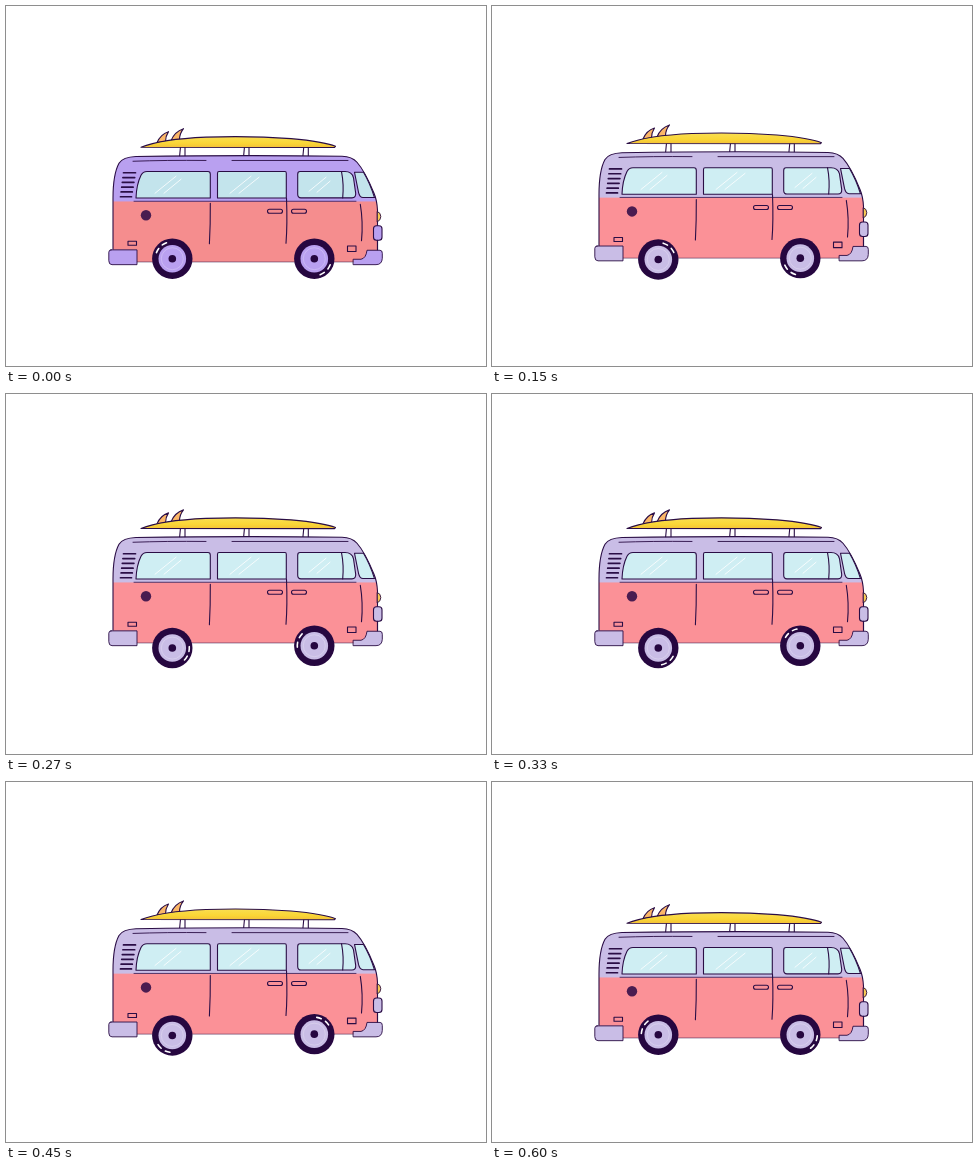
An HTML page for the animation above (630 ms loop, 480 px wide and 360 px high).

```html
<!DOCTYPE html>
<html lang="en">
<head>
<meta charset="utf-8">
<title>Camper van</title>
<style>
html, body { margin: 0; width: 100%; height: 100%; overflow: hidden; background: #fff; }
svg { display: block; width: 100vw; height: 100vh; }
.ink { stroke: #2a0d45; stroke-width: 1.1; stroke-linejoin: round; stroke-linecap: round; }
.thin { stroke-width: .9; }
.line { fill: none; }
.purple { fill: var(--purple); }
.pink { fill: var(--pink); }
.glass { fill: var(--glass); }
.glare { fill: none; stroke: #fff; stroke-width: 1; stroke-linecap: round; opacity: .8; }
.shine { fill: none; stroke: #fff; stroke-width: 1.6; stroke-linecap: round; }
</style>
</head>
<body>
<svg viewBox="0 0 480 360">
  <defs>
    <linearGradient id="wax" x1="0" y1="0" x2="0" y2="1">
      <stop offset="0" stop-color="#f9de52"/>
      <stop offset=".6" stop-color="#fad636"/>
      <stop offset="1" stop-color="#f3c138"/>
    </linearGradient>
    <clipPath id="shell">
      <path d="M107 255.8V192Q107 168 113 157Q117 150.800 130 150.300Q240 148.600 336 150Q346 150.300 351 156Q359 165 368 187Q371 194 371.500 204V255.800Z"/>
    </clipPath>
    <g id="wheel">
      <circle r="20.2" fill="#260740"/>
      <circle class="purple" r="13.8"/>
      <circle r="11" fill="none" stroke="#fff" stroke-width=".8" opacity=".3"/>
      <circle r="3.8" fill="#260740"/>
    </g>
  </defs>

  <path id="poles" class="ink" fill="#fff"/>

  <g id="body">
    <g clip-path="url(#shell)">
      <rect class="purple" x="100" y="145" width="280" height="51"/>
      <rect class="pink" x="100" y="195.2" width="280" height="62"/>
    </g>
    <path class="ink line" d="M107 243V192Q107 168 113 157Q117 150.800 130 150.300Q240 148.600 336 150Q346 150.300 351 156Q359 165 368 187Q371 194 371.500 204V244"/>
    <path class="ink line thin" stroke-opacity=".55" d="M131 255.700H347"/>
    <path class="ink line thin" d="M127 155Q160 153.800 200 154.200M226 154.200H342"/>
    <path class="ink line thin" stroke-opacity=".85" d="M128 195H350"/>

    <path class="ink glass" d="M141 165.300H202Q204.300 165.300 204.300 168V191.800H130Q130.500 178 135 169Q137 165.300 141 165.300Z"/>
    <path class="ink glass" d="M213 165.300H279Q280.300 165.300 280.300 167V191.800H211.500V167Q211.500 165.300 213 165.300Z"/>
    <path class="ink glass" d="M294 165.300H339Q346 165.300 347.500 171.500L349.700 187Q350 191.600 346 191.600H295Q291.700 191.600 291.700 188V168Q291.700 165.300 294 165.300Z"/>
    <path class="ink line" d="M335.500 165.300Q338 178 336.700 191.600"/>
    <path class="ink glass" d="M348.500 166H357.500Q364 177 368.500 191.300H357Q353.800 191.300 352.500 186Z"/>
    <path class="glare" d="M149 187L170 170M158 187L175 173M224 187L245 170M233 187L253 171M303 185L320 171M311 186L324 175"/>

    <path id="vents" class="ink line" style="stroke-width:1.7"/>
    <path class="ink line" d="M204.300 197Q204.500 218 203.400 237.500M280.500 192Q281.500 218 280 237M354.300 198Q357.300 216 355.500 234.500"/>
    <rect class="ink pink" x="261.500" y="203" width="15" height="4" rx="2"/>
    <rect class="ink pink" x="285.500" y="203" width="15" height="4" rx="2"/>
    <circle cx="140" cy="209" r="5.200" fill="#4a1c50"/>
    <rect class="ink pink" x="122" y="235" width="8.500" height="4"/>
    <rect class="ink pink" x="341.500" y="239.700" width="8.500" height="5.500"/>

    <path class="ink thin" fill="#f8cb55" d="M371.500 205.300Q374.800 206.500 374.800 210.300T371.500 215.500Z"/>
    <rect class="ink purple" x="367.500" y="219.500" width="8.500" height="14.500" rx="3"/>
    <path class="ink line" d="M371.500 234V244"/>
    <path class="ink purple thin" d="M105 243.600H131V258.400H106Q102.800 258.400 102.800 254.400V246Q102.800 243.600 105 243.600Z"/>
    <path class="ink purple thin" d="M347.500 253H355Q360 252 361 244H374Q376.300 244 376.300 247V252Q376 258.400 370 258.400H347.500Z"/>
  </g>

  <g id="board">
    <path class="ink" fill="#fbb767" d="M151 137Q154.500 128.500 162.500 126Q159.500 130.500 159.500 136ZM165 135Q168.500 126 177.500 123Q173.500 128 173.500 134Z"/>
    <path class="ink" fill="url(#wax)" d="M135 141.600Q155 133.500 200 131.500Q245 130 285 133Q318 136 329.500 140.700L328.500 141.800Z"/>
  </g>

  <g id="rear"><use href="#wheel"/><path class="shine"/></g>
  <g id="front"><use href="#wheel"/><path class="shine"/></g>
</svg>
<script>
const LOOP = 630, STEP = 30, TURN = 2 * Math.PI;
const $ = id => document.getElementById(id);
const svg = document.querySelector('svg');
const move = (id, x, y) => $(id).setAttribute('transform', `translate(${x} ${y.toFixed(2)})`);

function arc(r, from, to) {
  const at = deg => {
    const a = deg * TURN / 360;
    return `${(r * Math.cos(a)).toFixed(2)} ${(r * Math.sin(a)).toFixed(2)}`;
  };
  return `M${at(from)}A${r} ${r} 0 0 1 ${at(to)}`;
}

const marks = ['rear', 'front'].map(id => {
  const mark = $(id).querySelector('path');
  mark.setAttribute('d', arc(17, -24, -8) + arc(17, 9, 25));
  return mark;
});

$('vents').setAttribute('d', [0, 1, 2, 3, 4, 5].map(i =>
  `M${117.5 - i * .6} ${166.5 + i * 4.8}H${129.5 - i * .8}`).join(''));

// The first step of each loop has stronger colours.
function tint(vivid) {
  const [purple, pink, glass] = vivid
    ? ['#b9a0f0', '#f58d8e', '#c3e4ec']
    : ['#c9bde6', '#fb9197', '#cfeef3'];
  svg.style.setProperty('--purple', purple);
  svg.style.setProperty('--pink', pink);
  svg.style.setProperty('--glass', glass);
}

function draw(time) {
  const step = Math.floor(time % LOOP / STEP);
  const t = step * STEP;
  const sway = Math.cos(TURN * (t + STEP / 2) / LOOP);
  const body = 3.6 * sway - 3.3, board = 3.5 * sway - 3.8;

  move('body', 0, body);
  move('board', 0, board);
  const top = 141 + board, roof = 151 + body;
  $('poles').setAttribute('d', [173.5, 237.5, 296.8].map(x =>
    `M${x + 1} ${top}L${x} ${roof}H${x + 5.5}V${top}Z`).join(''));

  move('rear', 166.3, 253.4 - .7 * sway);
  move('front', 308.3, 252.2 + .5 * sway);
  const spin = 45 + 360 * t / LOOP;
  marks[0].setAttribute('transform', `rotate(${spin + 180})`);
  marks[1].setAttribute('transform', `rotate(${spin})`);
  tint(step === 0);
}

const start = performance.now();
function tick() {
  draw(performance.now() - start);
  requestAnimationFrame(tick);
}
tick();
</script>
</body>
</html>
```
